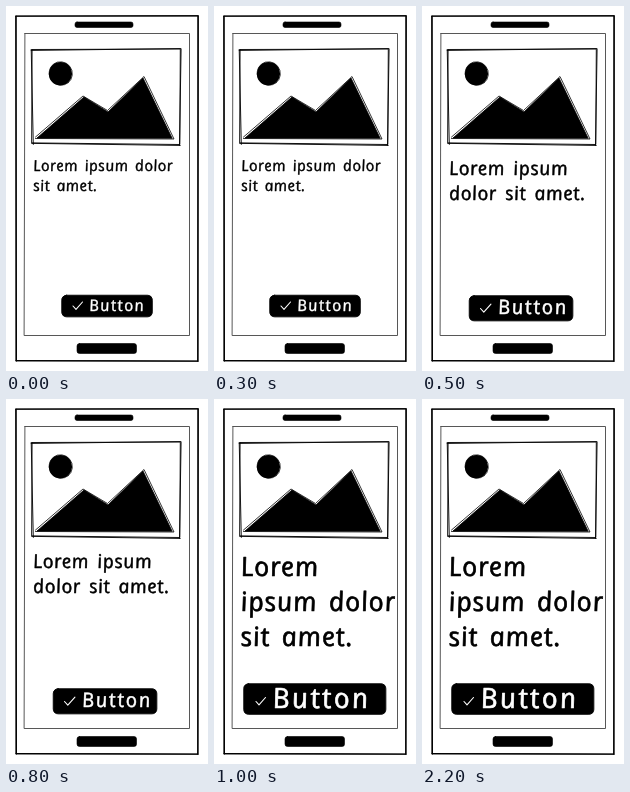
Recreate the animation shown at these times as an HTML page with a canvas. Size 202 by 365 pixels, loop 3000 ms.

```html
<!DOCTYPE html>
<html lang="en">
<head>
<meta charset="utf-8">
<title>Text size preview</title>
<style>
html, body { margin: 0; width: 100%; height: 100%; overflow: hidden; background: #fff; }
canvas { display: block; width: 202px; height: 365px; }
</style>
</head>
<body>
<canvas></canvas>
<script>
const W = 202, H = 365, LOOP = 3000;
const FONT = '"Open Sans", "Noto Sans", sans-serif';

const steps = [
  { from: 0, size: 16, top: 164.5, lines: ['Lorem ipsum dolor', 'sit amet.'],
    box: [56, 289.5, 90, 21], label: [84, 304.5], tick: [67, 300, 1] },
  { from: 500, size: 20, top: 169, lines: ['Lorem ipsum', 'dolor sit amet.'],
    box: [47.5, 290, 103, 24.5], label: [77, 308], tick: [58.5, 302.5, 1.1] },
  { from: 1000, size: 28, top: 176.5, lines: ['Lorem', 'ipsum dolor', 'sit amet.'],
    box: [30, 285, 141.5, 30], label: [60, 309], tick: [42, 302.5, 1] }
];

const canvas = document.querySelector('canvas');
const ctx = canvas.getContext('2d');
const scale = window.devicePixelRatio || 1;
canvas.width = W * scale;
canvas.height = H * scale;

function line(points, width, closed) {
  ctx.beginPath();
  points.forEach(([x, y]) => ctx.lineTo(x, y));
  if (closed) ctx.closePath();
  ctx.lineWidth = width;
  ctx.stroke();
}

function bar(x, y, w, h, r) {
  ctx.beginPath();
  ctx.roundRect(x, y, w, h, r);
  ctx.fill();
  ctx.lineWidth = 0.6;
  ctx.stroke();
}

// Two loose passes per side, like a pen going over the edge again.
function sketchRect(x, y, w, h, width, loose) {
  const r = x + w, b = y + h, d = loose;
  line([[x, y], [r, y - d * 0.3], [r - d * 0.3, b], [x + d * 0.2, b - d]], width, true);
  line([[x - d * 0.5, y + d * 0.6], [r + d * 0.4, y - d * 0.6]], width);
  line([[r + d * 0.5, y], [r - d * 0.5, b + d * 0.5]], width);
  line([[r, b + d * 0.6], [x, b - d * 0.7]], width);
  line([[x + d, b], [x - d * 0.3, y]], width);
}

// Italic letterforms, leaned back to nearly upright.
function write(text, x, y, size, spacing, color) {
  ctx.save();
  ctx.translate(x, y);
  ctx.transform(1, 0, 0.18, 1, 0, 0);
  ctx.font = `italic 500 ${size}px ${FONT}`;
  ctx.letterSpacing = size * spacing + 'px';
  ctx.wordSpacing = size * 0.14 + 'px';
  ctx.fillStyle = ctx.strokeStyle = color;
  ctx.lineWidth = size * 0.025;
  ctx.fillText(text, 0, 0);
  ctx.strokeText(text, 0, 0);
  ctx.restore();
}

function drawPhone() {
  sketchRect(10, 10, 182, 345, 1.2, 0.4);
  ctx.strokeStyle = '#444';
  line([[18.5, 27.5], [183.5, 27.5], [183.5, 329.5], [18.5, 329.5]], 0.9, true);
  ctx.strokeStyle = '#000';
  bar(69, 16, 58, 5.5, 2);
  bar(71, 337.5, 59.5, 10, 2.5);
}

function drawPicture() {
  sketchRect(25.7, 43.5, 148.6, 95, 0.9, 1.6);
  ctx.beginPath();
  ctx.ellipse(54.4, 67.7, 11.6, 11.8, 0.4, 0, 7);
  ctx.fill();
  ctx.lineWidth = 0.7;
  ctx.beginPath();
  ctx.ellipse(54.8, 67.5, 11.9, 11.5, 0.9, 0, 7);
  ctx.stroke();

  const hills = [[31, 132], [78, 91], [102, 106], [137, 72], [166, 132]];
  line(hills, 0.8, true);
  ctx.fill();
  line([[29.5, 131], [77, 90], [101.5, 104.5], [138, 70.5], [168, 133], [29.5, 132.5]], 0.8);
}

function drawButton({ box: [x, y, w, h], label, tick: [tx, ty, s], size }) {
  bar(x, y, w, h, 4);
  ctx.lineWidth = 0.8;
  ctx.beginPath();
  ctx.roundRect(x - 0.3, y - 0.3, w + 0.7, h + 0.7, 5);
  ctx.stroke();
  ctx.strokeStyle = '#fff';
  line([[tx, ty], [tx + 3 * s, ty + 3.3 * s], [tx + 9.5 * s, ty - 4 * s]], 1.1);
  ctx.strokeStyle = '#000';
  write('Button', ...label, size, 0.09, '#fff');
}

function draw(time) {
  const step = steps.findLast(s => s.from <= time % LOOP);
  ctx.setTransform(scale, 0, 0, scale, 0, 0);
  ctx.fillStyle = '#fff';
  ctx.fillRect(0, 0, W, H);
  ctx.fillStyle = ctx.strokeStyle = '#000';
  ctx.lineJoin = ctx.lineCap = 'round';

  drawPhone();
  drawPicture();
  step.lines.forEach((text, i) =>
    write(text, 28, step.top + i * step.size * 1.25, step.size * 0.95, 0.035, '#000'));
  drawButton(step);
}

const start = performance.now();
function tick() {
  draw(performance.now() - start);
  requestAnimationFrame(tick);
}
tick();
</script>
</body>
</html>
```
